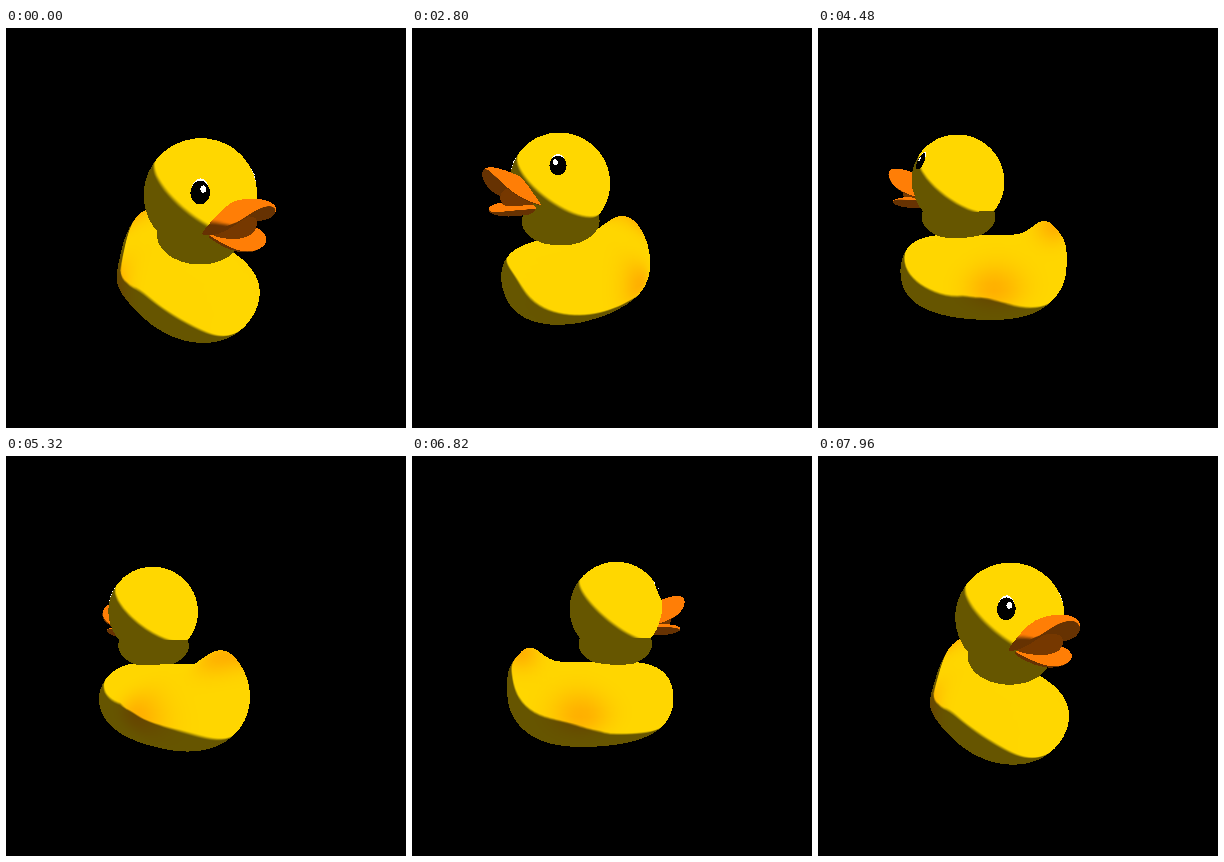
Animation, 400 px wide and 400 px high, one loop 8000 ms. Source, as an HTML page with a canvas:

```html
<!DOCTYPE html>
<html>
<head>
<meta charset="utf-8">
<style>
  html, body { margin: 0; height: 100%; overflow: hidden; background: #000; }
  canvas { display: block; width: 400px; height: 400px; }
</style>
</head>
<body>
<canvas id="stage" width="400" height="400"></canvas>
<script>
const SIZE = 400, LOOP = 8000, STEP = 60, CAMERA = 320;
const LIGHT = [0.57, 0.67, 0.46];
const YELLOW = [255, 215, 0], AMBER = [255, 176, 0], ORANGE = [255, 126, 6];
const MOUTH = [118, 56, 0], BLACK = [0, 0, 0], WHITE = [255, 255, 255];

// time, yaw, pitch, zoom, x, y
const POSES = [
  [0, 33, 25, 1.03, 173, 206],
  [1060, 33, 25, 1.03, 173, 206],
  [1780, 14, 19, 1.01, 169, 206],
  [2800, -51, 11, 0.97, 175, 202],
  [3580, -79, 6, 1, 172, 201],
  [4420, -98, 4, 1, 172, 202],
  [5260, -133, 3, 1.01, 170, 203],
  [5800, -133, 3, 1.01, 170, 203],
  [6580, -232, 3, 1, 172, 202],
  [6820, -259, 3, 1, 172, 201],
  [7420, -293, 11, 1, 172, 202],
  [7960, -330, 20, 1, 173, 203],
];

const { sin, cos, abs, exp, max, min, PI, hypot } = Math;
const rad = deg => deg * PI / 180;
const bell = (x, y) => exp(-x * x - y * y);
const round = (c, n) => max(0, 1 - abs(c) ** n) ** (1 / n);

// Model space: [side, up, forward]
function body(u, v) {
  const c = cos(u), f = 7 + 82 * c, rear = min(0, c);
  const lift = max(0, sin(v)) ** 2 * 15 * bell((f + 54) / 16, 0);
  const y = -46 + 6 * c * c + 10 * rear ** 4 + 41 * round(c, 3) * sin(v) + lift;
  const wing = 1 + 0.1 * bell((f + 18) / 26, (y + 44) / 18);
  return [59 * round(c, 2.4) * (1 + 0.15 * rear) * cos(v) * wing, y, f];
}

const ellipsoid = (cy, cf, rs, ry, rf) => (u, v) =>
  [rs * sin(u) * cos(v), cy + ry * sin(u) * sin(v), cf + rf * cos(u)];

function upperBill(u, v) {
  const s = 25 * round(cos(u), 2.6) * cos(v), f = 77 + 26 * cos(u);
  return [s, 50 + (f - 77) * 0.42 - 0.022 * s * s + 7 * sin(u) * sin(v), f];
}

function lowerBill(u, v) {
  const s = 20 * round(cos(u), 2.6) * cos(v);
  return [s, 27 + 0.01 * s * s + 5 * sin(u) * sin(v), 78 + 22 * cos(u)];
}

// Elliptic spot lying on the head, around a given direction
const spot = (azimuth, elevation, rx, ry, height) => (u, v) => {
  const a = azimuth + rx * u / PI * cos(v), e = elevation + ry * u / PI * sin(v);
  return [(47 + height) * cos(e) * sin(a), 48 + (46 + height) * sin(e),
          32 + (46 + height) * cos(e) * cos(a)];
};

function plumage([s, y, f]) {
  const wing = abs(s) > 25 ? bell((f + 14) / 23, (y + 44) / 18) : 0;
  return min(1, wing + bell((f + 63) / 17, (y - 6) / 15));
}

function normalAt(shape, u, v) {
  const h = 0.004, p = shape(u - h, v), q = shape(u + h, v);
  const r = shape(u, v - h), t = shape(u, v + h);
  const a = p.map((x, i) => q[i] - x), b = r.map((x, i) => t[i] - x);
  const n = [a[1] * b[2] - a[2] * b[1], a[2] * b[0] - a[0] * b[2], a[0] * b[1] - a[1] * b[0]];
  const len = hypot(...n) || 1;
  return n.map(x => x / len);
}

// A fixed light value replaces shading where given
function mesh(shape, rows, cols, color, { light, mix = () => 0 } = {}) {
  const points = [];
  for (let i = 0; i <= rows; i++) {
    for (let j = 0; j <= cols; j++) {
      const u = PI * i / rows, v = 2 * PI * j / cols, pos = shape(u, v);
      const normal = normalAt(shape, min(PI - 0.02, max(0.02, u)), v);
      points.push({ pos, normal, mix: mix(pos) });
    }
  }
  return { points, rows, cols, color, light };
}

function eye(side, azimuth) {
  const a = side * rad(azimuth), e = rad(21), lit = { light: 1 };
  return [
    mesh(spot(a, e + 0.045, 0.14, 0.17, 0.2), 4, 20, WHITE, lit),
    mesh(spot(a, e, 0.155, 0.178, 0.45), 4, 20, BLACK, lit),
    mesh(spot(a - side * 0.05, e + 0.05, 0.05, 0.055, 0.7), 3, 12, WHITE, lit),
  ];
}

const duck = [
  mesh(body, 48, 40, YELLOW, { mix: plumage }),
  mesh(ellipsoid(13, 32, 37, 23, 37), 24, 32, YELLOW, { light: -1 }),
  mesh(ellipsoid(48, 32, 47, 46, 46), 32, 36, YELLOW),
  mesh(ellipsoid(37, 74, 20, 11, 16), 14, 18, MOUTH, { light: 1 }),
  mesh(upperBill, 24, 24, ORANGE),
  mesh(lowerBill, 22, 22, ORANGE),
  ...eye(1, 53),
  ...eye(-1, 36),
];

const context = document.getElementById("stage").getContext("2d");
const image = context.createImageData(SIZE, SIZE);
const pixels = new Uint32Array(image.data.buffer);
const depth = new Float32Array(SIZE * SIZE);

function shade(color, light, mix) {
  const k = min(1, max(0, light / 0.1));
  const level = 0.4 + 0.6 * k * k * (3 - 2 * k);
  const [r, g, b] = color.map((x, i) => (x + (AMBER[i] - x) * mix) * level);
  return (255 << 24 | b << 16 | g << 8 | r) >>> 0;
}

function triangle(a, b, c, color) {
  const area = (b.x - a.x) * (c.y - a.y) - (b.y - a.y) * (c.x - a.x);
  if (abs(area) < 1e-6) return;
  const left = max(0, Math.floor(min(a.x, b.x, c.x))), right = min(SIZE - 1, max(a.x, b.x, c.x));
  const top = max(0, Math.floor(min(a.y, b.y, c.y))), bottom = min(SIZE - 1, max(a.y, b.y, c.y));
  for (let y = top; y <= bottom; y++) {
    for (let x = left; x <= right; x++) {
      const px = x + 0.5, py = y + 0.5;
      const wb = ((px - a.x) * (c.y - a.y) - (py - a.y) * (c.x - a.x)) / area;
      const wc = ((b.x - a.x) * (py - a.y) - (b.y - a.y) * (px - a.x)) / area;
      const wa = 1 - wb - wc;
      if (wa < -1e-6 || wb < -1e-6 || wc < -1e-6) continue;
      const blend = key => wa * a[key] + wb * b[key] + wc * c[key];
      const z = blend("z"), i = y * SIZE + x;
      if (z <= depth[i]) continue;
      depth[i] = z;
      pixels[i] = shade(color, blend("light"), blend("mix"));
    }
  }
}

// Monotone cubic through the poses, so holds stay still
function poseAt(t) {
  let i = 0;
  while (i < POSES.length - 2 && t >= POSES[i + 1][0]) i++;
  const span = POSES[i + 1][0] - POSES[i][0], k = min(1, (t - POSES[i][0]) / span);
  return POSES[0].map((_, n) => {
    const slope = j => POSES[j + 1] && POSES[j]
      ? (POSES[j + 1][n] - POSES[j][n]) / (POSES[j + 1][0] - POSES[j][0]) : 0;
    const tangent = j => {
      const p = slope(j - 1), q = slope(j);
      return p * q > 0 ? 2 * p * q / (p + q) : 0;
    };
    const a = POSES[i][n], b = POSES[i + 1][n];
    const end = i + 2 === POSES.length ? slope(i) : tangent(i + 1);
    return a + (b - a) * k * k * (3 - 2 * k)
      + span * k * (1 - k) * (tangent(i) * (1 - k) - end * k);
  });
}

function render(t) {
  const [, yaw, pitch, zoom, cx, cy] = poseAt(t);
  const sy = sin(rad(yaw)), ky = cos(rad(yaw)), sp = sin(rad(pitch)), kp = cos(rad(pitch));
  const turn = ([s, y, f]) => {
    const z = f * ky - s * sy;
    return [f * sy + s * ky, y * kp - z * sp, y * sp + z * kp];
  };
  pixels.fill(0xff000000);
  depth.fill(-1e9);
  for (const part of duck) {
    const points = part.points.map(({ pos, normal, mix }) => {
      const [x, y, z] = turn(pos), n = turn(normal), k = zoom * CAMERA / (CAMERA - z);
      const light = part.light ?? n[0] * LIGHT[0] + n[1] * LIGHT[1] + n[2] * LIGHT[2];
      return { x: cx + x * k, y: cy - y * k, z, light, mix };
    });
    const row = part.cols + 1;
    for (let i = 0; i < part.rows; i++) {
      for (let j = 0; j < part.cols; j++) {
        const p = i * row + j;
        triangle(points[p], points[p + 1], points[p + row], part.color);
        triangle(points[p + 1], points[p + row + 1], points[p + row], part.color);
      }
    }
  }
  context.putImageData(image, 0, 0);
}

let shown = -1;
function tick() {
  const t = performance.now() % LOOP;
  const held = t < 1060 ? 0 : 1060 + Math.floor((t - 1060) / STEP) * STEP;
  if (held !== shown) render(shown = held);
  requestAnimationFrame(tick);
}
tick();
</script>
</body>
</html>
```
